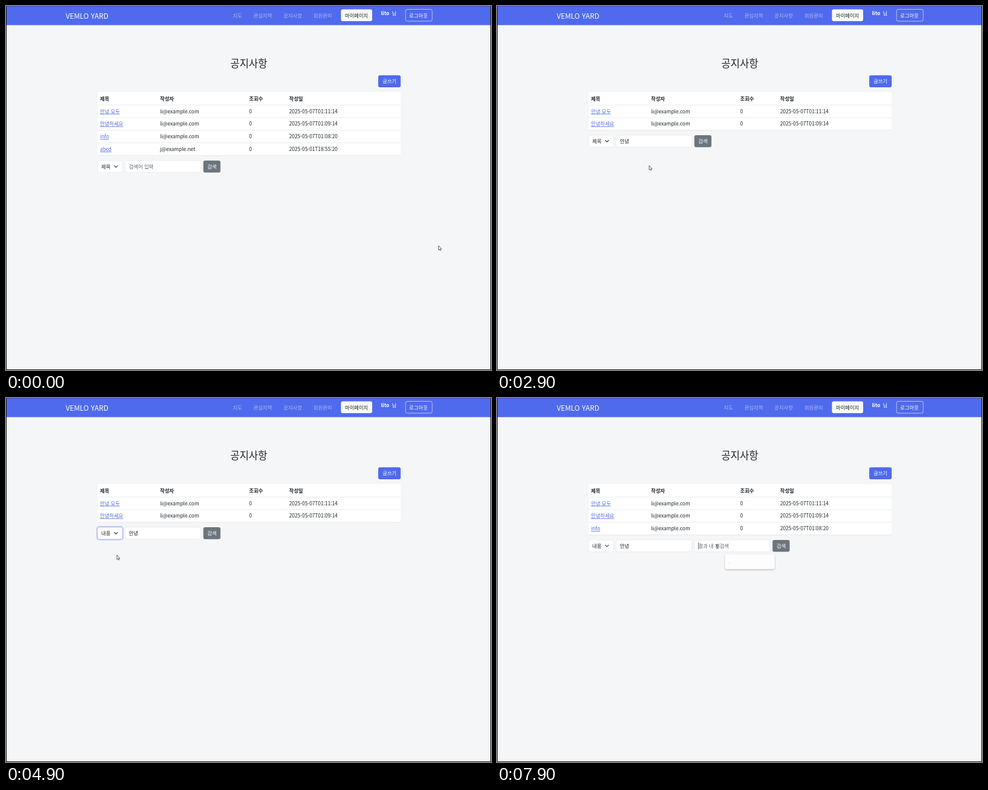
Recreate the animation shown at these times as an HTML page. Size 800 px wide and 600 px high, loop 8000 ms.

```html
<!DOCTYPE html>
<html lang="ko">
<head>
<meta charset="utf-8">
<style>
  html, body { margin: 0; width: 100%; height: 100%; overflow: hidden; background: #f5f6f7; }
  svg { display: block; }
  text { font: 8.3px "Noto Sans CJK KR", "Noto Sans CJK", "Noto Sans", sans-serif; fill: #212529; white-space: pre; }
  .bold { font-weight: 700; }
  .white { fill: #fff; }
  .nav { fill: #fff; fill-opacity: .55; }
  .link { fill: #4f6aec; text-decoration: underline; }
  .hint { fill: #5f656b; }
  .tiny { font-size: 6.8px; fill: #777; }
  .brand { font-size: 11.8px; fill: #fff; }
  .title { font-size: 16.6px; font-weight: 500; }
  .pop { filter: drop-shadow(0 1px 1.2px rgba(0,0,0,.3)); }
  .menu { filter: drop-shadow(0 11px 8px rgba(0,0,0,.28)); }
</style>
</head>
<body>
<svg width="800" height="600" viewBox="0 0 800 600">
  <g id="page"></g>
  <g id="live"></g>
</svg>
<script>
const BLUE = '#4f6aec', LINE = '#dee2e6', LOOP = 8000, ROW = 20.85, TOP = 163;
const $ = id => document.getElementById(id);

// Text is placed by its left edge and vertical centre.
const text = (x, cy, s, cls = '', drop = 3) => `<text x="${x}" y="${cy + drop}" class="${cls}">${s}</text>`;
const box = (x, y, w, h, fill, extra = 'rx="3"') =>
  `<rect x="${x}" y="${y}" width="${w}" height="${h}" fill="${fill}" ${extra}/>`;
const path = (d, extra) => `<path d="${d}" ${extra}/>`;

const posts = [
  ['안녕 모두', 'li@example.com', '2025-05-07T01:11:14'],
  ['안녕하세요', 'li@example.com', '2025-05-07T01:09:14'],
  ['info', 'li@example.com', '2025-05-07T01:08:20'],
  ['abcd', 'j@example.net', '2025-05-01T18:55:20']
];

// Steps: [time, value]
const rowSteps = [[0, 4], [2600, 2], [6600, 3]];
const typed = [[0, ''], [1500, 'ㅇ'], [1700, '아'], [1800, '안'], [2000, '안ㄴ'], [2100, '안녀'], [2300, '안녕']];
const focusSteps = [[0, ''], [1100, 'input'], [2600, ''], [4700, 'select'], [5600, 'input'], [6600, '']];
const last = (steps, t) => steps.filter(s => s[0] <= t).pop();

// Pointer: [time, x, y]
const moves = [
  [100, 713.5, 395], [850, 251, 263], [3000, 251, 263], [3600, 178, 224], [4300, 185.5, 224],
  [4550, 183, 257], [4900, 183, 259], [5400, 225, 223], [5700, 225, 223], [6150, 336, 225],
  [6900, 336, 225], [7700, 363, 245]
];

function pointer(t) {
  const i = moves.findIndex(m => m[0] > t);
  if (i < 1) return moves[i < 0 ? moves.length - 1 : 0].slice(1);
  const [a, b] = [moves[i - 1], moves[i]];
  const u = (t - a[0]) / (b[0] - a[0]), k = u * u * (3 - 2 * u);
  return [a[1] + (b[1] - a[1]) * k, a[2] + (b[2] - a[2]) * k];
}

function page() {
  const menu = [[374, '지도'], [408, '관심지역'], [457.5, '공지사항'], [507, '회원관리']];
  const heads = [[155, '제목'], [254, '작성자'], [401, '조회수'], [467, '작성일']];
  return box(0, 0, 800, 600, '#f5f6f7', '') + box(0, 0, 800, 31.5, BLUE, '') +
    text(98.5, 16, 'VEMLO YARD', 'brand', 4.5) +
    menu.map(([x, s]) => text(x, 16, s, 'nav')).join('') +
    box(552.5, 5.5, 51.5, 19.5, '#f8f9fa') + text(559, 15.5, '마이페이지') +
    text(618.5, 12, 'lito', 'white bold') + text(636.5, 12, '님', 'white') +
    box(659, 5.5, 44, 19.5, 'none', 'rx="3" stroke="#fff" stroke-width=".6"') + text(665, 15.5, '로그아웃', 'white') +
    text(370, 94.5, '공지사항', 'title', 6.3) +
    box(614, 114.3, 37, 19.6, BLUE) + text(621, 124, '글쓰기', 'white') +
    box(151, 142, 500, 21, '#fff', '') + heads.map(([x, s]) => text(x, 153, s, 'bold')).join('') +
    path('M151 163.3H651', `stroke="${LINE}" stroke-width=".8"`) +
    path('M.5 0V599.5H799.5V0', 'fill="none" stroke="#16171a"') +
    path('M0 .25H800', 'stroke="#26336f" stroke-width=".5"');
}

const tableRow = ([title, author, date], i) => {
  const y = TOP + i * ROW, cy = y + 10.6;
  return box(151, y + .7, 500, ROW - .7, '#fff', '') +
    path(`M151 ${y + ROW + .2}H651`, `stroke="${LINE}" stroke-width=".8"`) +
    text(155, cy, title, 'link') + text(254, cy, author) + text(401, cy, 0) + text(467, cy, date);
};

function field(x, w, cy, focused) {
  const ring = focused ? box(x - 1, cy - 10.8, w + 2, 21.6, 'none', `rx="4" stroke="${BLUE}" stroke-opacity=".3" stroke-width="2"`) : '';
  return ring + box(x, cy - 9.8, w, 19.6, '#fff', `rx="3" stroke="${focused ? '#a7b5f5' : LINE}" stroke-width=".6"`);
}

function popup(x, w, cy, items) {
  const y = cy + 14.2, h = 6 + 18.3 * items.length;
  return `<g class="pop">${box(x, y, w, h, '#fdfdfd')}${path(`M${x + 8} ${y}l3 -2.5l3 2.5z`, 'fill="#fdfdfd"')}</g>` +
    items.map((s, i) => text(x + 6, y + 12.3 + 18.2 * i, s, 'tiny', 2.5)).join('');
}

const caret = (x, cy, age) => age % 1000 < 500 ? path(`M${x} ${cy - 5.5}v11`, 'stroke="#222" stroke-width=".7"') : '';

function selectMenu(cy, hoverSecond) {
  const y = cy + 10.4, item = (i, s) => {
    const on = hoverSecond === !!i;
    return (on ? box(151, y + 16 * i + .4, 40.3, 15.6, '#4a60c4', 'rx="1.5"') : '') +
      text(157, y + 8.2 + 16.3 * i, s, on ? 'white' : '');
  };
  return `<g class="menu">${box(151, y, 40.3, 32.2, '#fff', 'rx="3" stroke="#bbb" stroke-width=".5"')}</g>` +
    item(0, '제목') + item(1, '내용');
}

const ink = 'fill="#fff" stroke="#333" stroke-width=".75" stroke-linejoin="round"';
const cursors = {
  arrow: path('M0 0V7.2L1.6 5.8L2.7 8.2L3.8 7.7L2.8 5.4H4.8Z', ink),
  beam: path('M-1.4 -3.3Q0 -3.3 0 -2.5Q0 -3.3 1.4 -3.3M0 -2.5V2.5M-1.4 3.3Q0 3.3 0 2.5Q0 3.3 1.4 3.3', 'fill="none" stroke="#333" stroke-width=".8"'),
  hand: path('M-.9 .2Q0 -.8 .7 .2V3L3.2 3.6Q4 4 3.8 5L3 8H-.8L-2.8 5Q-2.8 3.9 -.9 5Z', ink)
};

function live(t) {
  const rows = last(rowSteps, t)[1], cy = TOP + rows * ROW + 18.2;
  const [typedAt, value] = last(typed, t), [focusAt, focus] = last(focusSteps, t);
  const refine = t >= 6600, shift = refine ? 129 : 0;
  const [px, py] = pointer(t);
  const inRow = Math.abs(py - cy) < 9.8, over = (a, b) => inRow && px > a && px < b;
  const onButton = over(325.5 + shift, 353.7 + shift);
  const shape = onButton ? 'hand' : over(196, 322) || refine && over(326, 450) ? 'beam' : 'arrow';

  let out = posts.slice(0, rows).map(tableRow).join('');
  out += field(151, 41, cy, focus === 'select') + text(157, cy, t < 4700 ? '제목' : '내용') +
    path(`M178.7 ${cy - 1.4}l2.6 2.7l2.6 -2.7`, 'fill="none" stroke="#343a40" stroke-width="1.1" stroke-linecap="round"');
  out += field(196.3, 125.4, cy, focus === 'input') + text(202.7, cy, value || '검색어 입력', value ? '' : 'hint');
  if (focus === 'input') {
    const end = 202.7 + value.length * 7.64;
    out += caret(end + .4, cy, t - Math.max(focusAt, typedAt));
    if (value && t < 2600) out += path(`M${end - 7.4} ${cy + 5}H${end}`, 'stroke="#222" stroke-width=".7"');
  }
  if (refine) out += field(325.8, 124.4, cy) + text(332, cy, '결과 내 재검색', 'hint');
  out += box(325.5 + shift, cy - 9.8, 28.2, 19.6, onButton ? '#5c636a' : '#6c757d') + text(332 + shift, cy, '검색', 'white');

  if (t >= 1300 && t < 2600) out += popup(248, 80, cy, t < 1800 ? ['aa', '안녕'] : ['안녕']);
  if (t >= 7800) out += caret(332.3, cy, t - 7800) + popup(376, 82, cy, ['.']);
  if (t >= 3900 && t < 4700) out += selectMenu(cy, py > 249);
  return out + `<g transform="translate(${px} ${py})">${cursors[shape]}</g>`;
}

$('page').innerHTML = page();
let shown = '';
function frame() {
  const next = live(performance.now() % LOOP);
  if (next !== shown) $('live').innerHTML = shown = next;
  requestAnimationFrame(frame);
}
frame();
</script>
</body>
</html>
```
